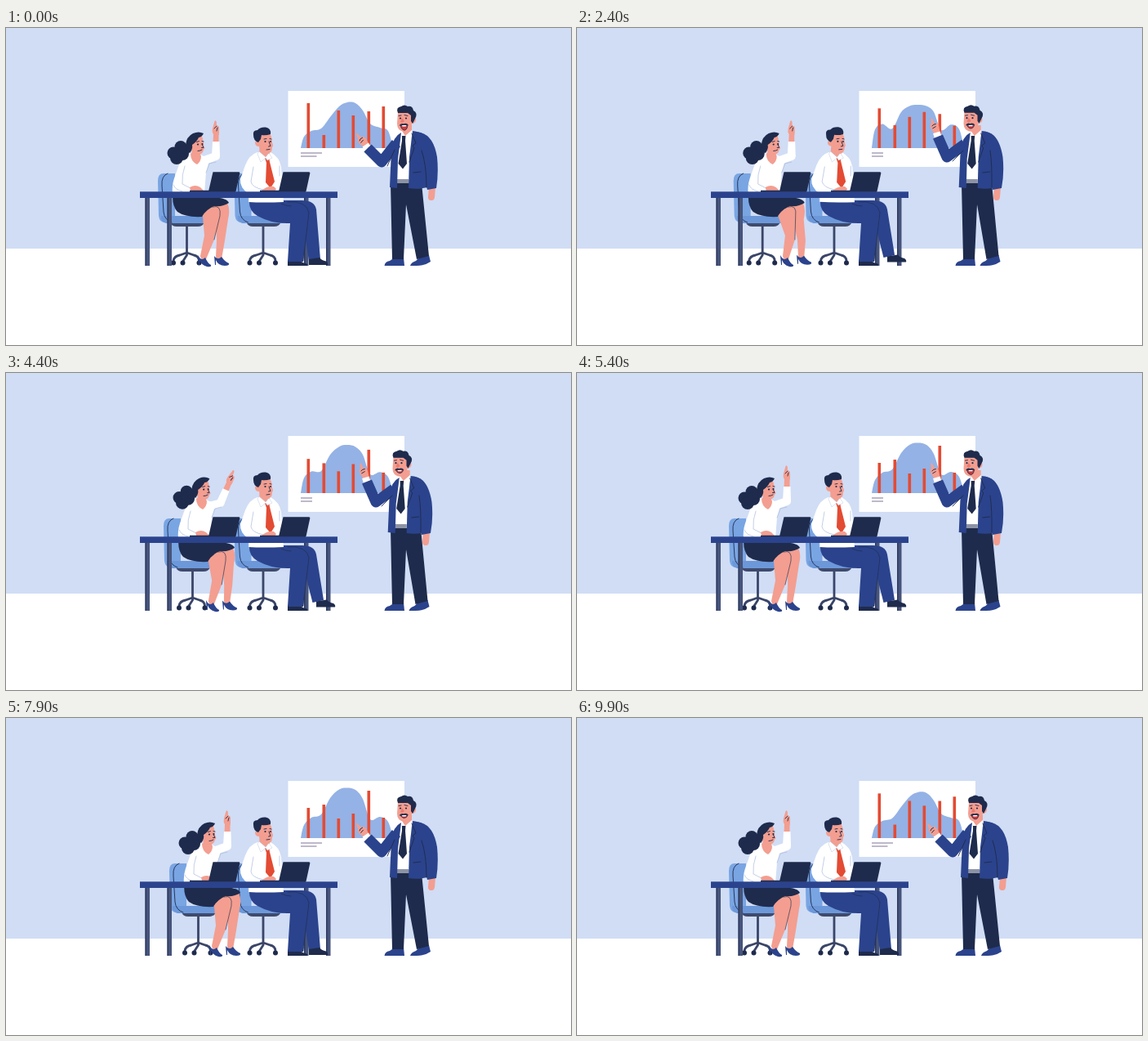
An HTML page for the animation above (10000 ms loop, 692 px wide and 388 px high).

```html
<!DOCTYPE html>
<html lang="en">
<head>
<meta charset="utf-8">
<title>Team presentation</title>
<style>
  html, body { margin: 0; width: 100%; height: 100%; overflow: hidden; background: #fff; }
  svg { display: block; width: 100vw; height: 100vh; }
  .navy { fill: #1f2b4c; } .blue { fill: #2b438c; } .skin { fill: #f39e90; }
  .white { fill: #fff; } .pale { fill: #79a5e3; } .red { fill: #e34b33; }
  .line { fill: none; stroke: #1f2b4c; stroke-width: .9; stroke-linecap: round; }
  .fold { fill: none; stroke: #a9bbdc; stroke-width: .7; stroke-linecap: round; }
  .limb { fill: none; stroke-linecap: round; stroke-linejoin: round; }
  .flat { stroke-linecap: butt; }
</style>
</head>
<body>
<svg viewBox="0 0 692 388" preserveAspectRatio="none">
  <defs>
    <g id="chair">
      <path class="limb" stroke="#3a4568" stroke-width="2.800" d="M221.500 242V278L217 285M205 285Q206 279 213 278L221.500 275L230 278Q236 279 236.500 285"/>
      <g class="navy"><circle cx="205" cy="287.500" r="3"/><circle cx="216.500" cy="287.500" r="3"/><circle cx="236.500" cy="287.500" r="3"/></g>
      <path fill="#3f4a6c" d="M201 238H243Q241 243 235 243H209Q203 243 201 238Z"/>
      <path class="pale" d="M193 178H207V238H195Q188 238 187 230L186 187Q186 178 193 178Z"/>
      <path fill="#6c98da" d="M190 230H246Q251 232 250 236Q249 239 244 239H196Q189 237 190 230Z"/>
      <path class="line" d="M198 178Q190 181 191 193L193 225Q194 235 203 238"/>
    </g>
    <g id="laptop">
      <path class="navy" d="M253.500 176.300H285Q286.800 176.300 286.300 178L281.500 200H248Z"/>
      <path class="navy" d="M225 198.700H281V201H225Z"/>
    </g>
  </defs>

  <rect width="692" height="388" fill="#fff"/>
  <rect width="692" height="270" fill="#d0ddf5"/>
  <rect class="white" x="345.500" y="77" width="142.500" height="93"/>
  <path id="area" fill="#94b2e5"/>
  <g id="bars" class="red"></g>
  <path id="captions" stroke="#aaa2b9" stroke-width="1.300"/>

  <g id="presenter">
    <path class="blue" d="M463.500 291Q464 286 470 285L476 281H487L488 291Z"/>
    <g id="farFoot"><path class="blue" d="M495 291Q496 287 502 285L507 280L518 278L520 286Q513 291 503 291Z"/></g>
    <path id="trousers" class="navy"/>
    <path id="restHand" class="limb" stroke="#f39e90" stroke-width="8"/>
    <g id="torso">
      <path class="white" d="M484 128L496 126L497 186H479V140Z"/>
      <path fill="#8c93a6" d="M479 185H493V190H479Z"/>
      <path class="skin" d="M486 119H497V129L489 133L485 129Z"/>
      <path class="white" d="M485 126L489 132L497 125L499 131L491 137L488 132L484 136Z"/>
      <path class="navy" d="M485 132L489.500 132L489 138L491 166L486 172.500L480.500 166L485 138Z"/>
      <path class="blue" d="M484 128Q474 133 472 149L470 195L479 196L480 160L483 137Z"/>
      <path class="blue" d="M498 126Q512 127 517 138L516 195Q504 198 493 196L494 158Z"/>
      <path class="line" d="M497 129L502 141L498 144L500 147L494 164M499 177L508 176"/>
    </g>
    <path id="restArm" class="blue"/>
    <path id="restFold" class="line"/>
    <g id="hand"><path class="skin" d="M-3 9L-5 2Q-6 -3 -3 -4L-2 -9Q-1 -12 0 -9L1 -3Q5 -3 5 1L4 9Z"/>
      <path class="line" d="M-3 -1Q-1 -3 2 -2M-3 2L1 1" stroke-width=".7"/></g>
    <path id="cuff" class="limb flat" stroke="#fff" stroke-width="9"/>
    <path id="showArm" class="limb flat" stroke="#2b438c" stroke-width="13"/>
    <path id="showFold" class="line"/>
    <g id="presenterHead">
      <path class="skin" d="M480 103H496L498 109Q502 108 502 113Q501 117 497 117Q497 127 488 127Q479 126 479 117Z"/>
      <path class="navy" d="M480 104Q477 97 484 96Q488 93 492 96Q498 95 499 101Q505 104 501 111L498 117L496 114L496 107L492 104Z"/>
      <path class="line" d="M481 107.500L484 107M488 106.500L492 107.500"/>
      <g id="presenterEyes" class="navy"><circle cx="483" cy="110.500" r="1.100"/><circle cx="490" cy="110.500" r="1.100"/></g>
      <path fill="#e97b70" d="M485 110L483 115Q486 117 488 114Z"/>
      <path id="mouth" fill="#c83c3e" stroke="#1f2b4c" stroke-width=".8"/>
      <path class="white" d="M485 119H490.500L489.500 120.500H485.500Z"/>
      <path class="navy" d="M481.500 119.500Q483 116 487 117.200Q491 116 493 119Q488 118.200 481.500 119.500Z"/>
    </g>
  </g>

  <use href="#chair" x="93.500"/>
  <use id="womanChair" href="#chair"/>
  <g id="tableLegs"></g>

  <g id="man">
    <path id="manFarLeg" class="blue"/>
    <g id="manFarShoe"><path class="navy" d="M371 290V283L384 281Q386 284 392 285.500Q395 287.500 394 290Z"/></g>
    <path class="navy" d="M345 291V284H360Q362 287 367 288Q370 289 369 291Z"/>
    <path class="blue" d="M298 211H355Q370 212 371 226L364 286H345L348 239Q326 240 308 230Q297 224 298 211Z"/>
    <path class="line" d="M345 213Q368 211 371 226L364 285M337 215Q343 218 349 218" opacity=".7"/>
    <g id="manTorso">
      <path class="white" d="M308 152Q298 155 293 168L287 185Q286 195 297 203V213Q315 214 340 213L337 170Q335 158 324 152Z"/>
      <path class="skin" d="M311 141H323V154L318 160L310 154Z"/>
      <path class="red" d="M317 159L322 158L323 164L329 188L324 196L318 189L319 165Z"/>
      <path class="white" d="M310 151L318 158L322 153L326 159L320 162L318 159L312 164L308 154Z" stroke="#b9c7e1" stroke-width=".5"/>
      <path class="fold" d="M303 170L300 188Q301 195 315 198M297 203V212M335 169L335 181"/>
      <path class="skin" d="M313 199Q320 193 328 194L331 197L329 200Z"/>
    </g>
    <g id="manHead">
      <path class="skin" d="M309 131L323 128Q326 134 326 140L327 144L326 146Q326 154 319 154Q311 153 310 145Q305 145 305 140Q306 137 310 139Z"/>
      <path class="navy" d="M303 131Q302 125 308 125Q311 121 318 121.500Q325 122.500 324 130Q318 132 313 131L312 136L309 140Q303 138 303 131Z"/>
      <path class="line" d="M316 136L319 135.500M323 135.500L325 136M319 149L323 148.500M322 139L324 144.500L321.500 145"/>
      <g id="manEyes" class="navy"><circle cx="317.500" cy="139" r="1.100"/><circle cx="324" cy="139" r="1"/></g>
    </g>
  </g>

  <g id="woman">
    <path id="farLeg" class="skin"/>
    <g id="farShoe"><path class="blue" d="M255 279Q259 285 264 280Q268 286 273 288Q274 291 268 291Q260 291 257 284V290H256Z"/></g>
    <path id="nearLeg" class="skin"/>
    <path id="legFold" class="line" opacity=".7"/>
    <g id="nearShoe"><path class="blue" d="M235 278Q239 286 244 281Q247 288 251 290Q252 293 246 292Q239 290 237 284V290H236Z"/></g>
    <path class="navy" d="M205 199H243L248 207Q271 207 273 214Q266 219 255 218Q245 222 240 231Q220 232 210 225Q202 216 205 199Z"/>
    <path id="womanArm" class="limb" stroke="#fff" stroke-width="10"/>
    <g id="womanHand">
      <path class="skin" d="M16 -3.500L27 -3Q29 -5 34 -4L43 -1.500Q45 0 42 .8L37 1Q38 4 34 4L28 4L25 3.500L16 3.500Z"/>
      <path class="line" d="M34 -2L37 1M31 1L35 2" stroke-width=".7"/>
      <path class="white" d="M0 -5L18 -4V4.500L0 5Z"/>
    </g>
    <path class="white" d="M226 153Q215 158 212 167L206 184Q203 193 204 202H243L245 177Q248 168 249 160L238 155Z"/>
    <path class="fold" d="M219 169Q215 180 216 191L226 196M205 192Q207 198 216 200M245 177L249 166L257 164"/>
    <path class="skin" d="M226 154L234 146L239 157Q239 163 234 167Q226 163 226 154ZM225 195Q232 191 238 195L242 199H226Z"/>
    <g id="womanHead">
      <g class="navy"><circle cx="205" cy="153" r="7.500"/><circle cx="214" cy="145.500" r="7.500"/><circle cx="209" cy="159" r="8"/><circle cx="216" cy="154" r="8"/><circle cx="220" cy="148" r="6"/></g>
      <path class="skin" d="M227 136L239 130Q242 136 242 143L243.500 147L242 149Q241 155 234 155Q225 153 225 143Z"/>
      <path class="navy" d="M242 129Q236 126 229 129Q221 133 220 143Q220 150 225 153Q229 148 228 143Q234 139 236 134Q240 133.500 242 129Z"/>
      <path class="line" d="M233.500 139.500L236.500 138.500M240 138.500L242 139M235 150.500Q238 150.500 240 149M240 142L242 146.500H239.500"/>
      <g id="womanEyes" class="navy"><circle cx="235" cy="142.500" r="1.100"/><circle cx="240.500" cy="142" r="1"/></g>
    </g>
  </g>

  <use href="#laptop"/>
  <use href="#laptop" x="86"/>
  <rect class="blue" x="164" y="200.300" width="242" height="7.700"/>
</svg>

<script>
const PERIOD = 10000, STEP = 100;
const el = Object.fromEntries([...document.querySelectorAll('[id]')].map(n => [n.id, n]));
const set = (id, name, value) => el[id].setAttribute(name, value);
const move = (id, x, y = 0) => set(id, 'transform', `translate(${x} ${y})`);
const mix = (a, b, k) => a + (b - a) * k;
const ramp = (t, from, to) => {
  const k = Math.min(1, Math.max(0, (t - from) / (to - from)));
  return k * k * (3 - 2 * k);
};
const pulse = (t, a, b, c, d) => ramp(t, a, b) - ramp(t, c, d);

// Chart states, blended on a closed smooth track
const times = [0, 1400, 3400, 5400, 6650, 7900];
const barX = [370, 389, 407, 425, 444, 462];
const barStates = [
  [92, 131, 101, 107, 102, 96], [95, 124, 102, 100, 110, 115],
  [102, 114, 116, 107, 99, 122], [110, 106, 123, 117, 89, 122],
  [130, 92, 118, 130, 84, 130], [110, 106, 123, 117, 89, 122]];
const areaX = [361, 365, 374, 386, 397, 408, 418, 428, 437, 446, 458, 468, 474];
const tall = [147, 131, 122, 118, 98, 87.500, 85.500, 88, 99, 124, 121, 127, 147];
const areaStates = [
  [147, 133, 126, 123, 109, 96, 91, 92, 101, 117, 122, 126, 147],
  [147, 124, 117, 124, 104, 97, 96, 97, 104, 125, 116, 121, 147],
  [147, 126, 119, 122, 102, 93, 91, 93, 101, 124, 121, 127, 147],
  tall, tall, tall];

function blend(states, t) {
  const n = times.length;
  const at = i => times[(i + n) % n] + PERIOD * Math.floor(i / n);
  const i = times.filter(x => x <= t).length - 1;
  const span = at(i + 1) - at(i), k = (t - at(i)) / span;
  const state = j => states[(j + n) % n];
  return state(i).map((a, c) => {
    const b = state(i + 1)[c];
    const m0 = (b - state(i - 1)[c]) / (at(i + 1) - at(i - 1)) * span * .7;
    const m1 = (state(i + 2)[c] - a) / (at(i + 2) - at(i)) * span * .7;
    const k2 = k * k, k3 = k2 * k;
    return a * (2 * k3 - 3 * k2 + 1) + m0 * (k3 - 2 * k2 + k) + b * (3 * k2 - 2 * k3) + m1 * (k3 - k2);
  });
}

function curve(points) {
  let d = `M${points[0]}`;
  for (let i = 0; i < points.length - 1; i++) {
    const [p, a, b, q] = [-1, 0, 1, 2].map(o => points[Math.min(points.length - 1, Math.max(0, i + o))]);
    d += `C${[0, 1].map(c => a[c] + (b[c] - p[c]) / 6)} ${[0, 1].map(c => b[c] - (q[c] - a[c]) / 6)} ${b}`;
  }
  return d;
}

barX.forEach(x => el.bars.insertAdjacentHTML('beforeend', `<rect x="${x - 1.5}" width="3.6"/>`));
[170.5, 197.5, 365, 392].forEach(x => el.tableLegs.insertAdjacentHTML('beforeend',
  `<rect x="${x}" y="207" width="5.5" height="84" fill="#47547b"/><rect x="${x}" y="207" width="1.5" height="84" fill="#2e3a60"/>`));

function drawChart(t, raised) {
  const tops = blend(barStates, t);
  [...el.bars.children].forEach((bar, i) => {
    bar.setAttribute('y', tops[i]);
    bar.setAttribute('height', 147 - tops[i]);
  });
  const heights = blend(areaStates, t);
  set('area', 'd', curve(areaX.map((x, i) => [x, heights[i]])) + 'Z');
  set('captions', 'd', `M361 153H${mix(387, 375, raised)}M361 157H${mix(380.5, 375, raised)}`);
}

function drawPresenter(t, raised, point) {
  const pose = (low, up, out) => low.map((v, i) => v + (up[i] - v) * raised + (out[i] - v) * point);
  const [sx, sy] = pose([478, 141], [475, 142], [477, 142]);
  const [ex, ey] = pose([460, 164], [453, 158], [450, 157]);
  const [wx, wy] = pose([443, 147], [442, 133], [427, 141]);
  const [hx, hy] = pose([436, 137], [438, 120], [416, 132]);
  set('showArm', 'd', `M${sx} ${sy}L${ex} ${ey}L${wx} ${wy}`);
  set('showFold', 'd', `M${sx - 2} ${sy + 8}L${ex + 7} ${ey + 5}`);
  set('cuff', 'd', `M${wx} ${wy}L${mix(wx, hx, .4)} ${mix(wy, hy, .4)}`);
  const turn = Math.atan2(hy - wy, hx - wx) * 180 / Math.PI + 90;
  set('hand', 'transform', `translate(${hx} ${hy}) rotate(${turn})`);

  const shoulder = mix(510, 507, raised), elbow = mix(522, 515.5, raised), wrist = mix(521, 514, raised);
  set('restArm', 'd', `M${shoulder - 9} 127Q${elbow + 1} 127 ${elbow + 6} 158Q${elbow + 8} 178 ${wrist + 6} 196L${wrist - 5} 198L${shoulder - 2} 165Z`);
  set('restHand', 'd', `M${wrist + 1} 195L${wrist} 207`);
  set('restFold', 'd', `M${shoulder - 1} 150Q${elbow - 7} 167 ${wrist - 6} 195`);

  const lean = Math.min(1, raised + point);
  move('presenterHead', -5.5 * lean, -.3 * raised);
  move('torso', -2.3 * lean);
  const step = 4 * point - 1.5 * raised;
  move('farFoot', step);
  set('trousers', 'd', `M471 190H${509 - raised}L${518 + step} 279L${503 + step} 283L490 216L487 283H473Z`);
  const open = .5 + .5 * Math.cos(2 * Math.PI * 22 * t / PERIOD);
  set('mouth', 'd', `M483 119H492Q491 ${mix(122, 126, open)} 487 ${mix(122, 125, open)}Q484 ${mix(121, 124, open)} 483 119Z`);
}

function drawMan(t, raised) {
  const nod = pulse(t % 5000, 500, 1500, 2000, 2800);
  set('manHead', 'transform', `translate(${3.5 * nod} ${-.5 * nod}) rotate(${2 * nod} 316 150)`);
  set('manTorso', 'transform', `rotate(${nod} 318 210)`);
  const foot = 9 * raised;
  move('manFarShoe', foot, -3.5 * raised);
  set('manFarLeg', 'd', `M330 211H362Q378 211 380 222L${385 + foot * .45} ${283 - 5 * raised}L${371 + foot * .5} ${285 - 4 * raised}L362 228Z`);
}

function drawWoman(t) {
  const c = t % 5000, wave = t % 2500;
  const roll = 14 * pulse(c, 2050, 2850, 4050, 4750);
  const step = 14 * pulse(c, 1600, 2300, 4150, 4850) - roll;
  const point = pulse(wave, 400, 1400, 1400, 2300);
  ['woman', 'womanChair'].forEach(id => move(id, roll));
  move('farShoe', step, -Math.abs(step) * .15);
  move('nearShoe', step);

  const calf = step * .75;
  set('farLeg', 'd', `M246 215L271 214Q275 222 272 234L${268 + calf} 260L${264 + step} 283Q${259 + step} 285 ${257 + step} 280L${258 + calf} 260L257 222Z`);
  set('nearLeg', 'd', `M241 231Q241 219 255 216Q265 217 262 230L${255 + calf} 259L${245 + step} 283Q${239 + step} 285 ${238 + step} 279L${243 + calf} 254Z`);
  set('legFold', 'd', `M253 219Q264 216 262 230L${255 + calf} 259`);
  const ex = mix(257, 253, point), ey = mix(157, 163, point);
  set('womanArm', 'd', `M237 164L${ex} ${ey}`);
  set('womanHand', 'transform', `translate(${ex} ${ey}) rotate(${mix(-90, -35, point)})`);
  set('womanHead', 'transform', `rotate(${2 * point} 232 155)`);
}

function blink(id, y, closed) {
  set(id, 'transform', closed ? `translate(0 ${y * .8}) scale(1 .2)` : '');
}

function draw(t) {
  const raised = pulse(t, 300, 1150, 5600, 6500);
  const point = pulse(t, 5700, 6600, 7050, 7800);
  drawChart(t, raised);
  drawPresenter(t, raised, point);
  drawMan(t, raised);
  drawWoman(t);
  const closed = t % 5000 >= 3300 && t % 5000 < 3500;
  blink('womanEyes', 142.3, closed);
  blink('presenterEyes', 110.5, closed);
}

const start = performance.now();
function tick() {
  const t = (performance.now() - start) % PERIOD;
  draw(Math.floor(t / STEP) * STEP);
  requestAnimationFrame(tick);
}
draw(0);
requestAnimationFrame(tick);
</script>
</body>
</html>
```
